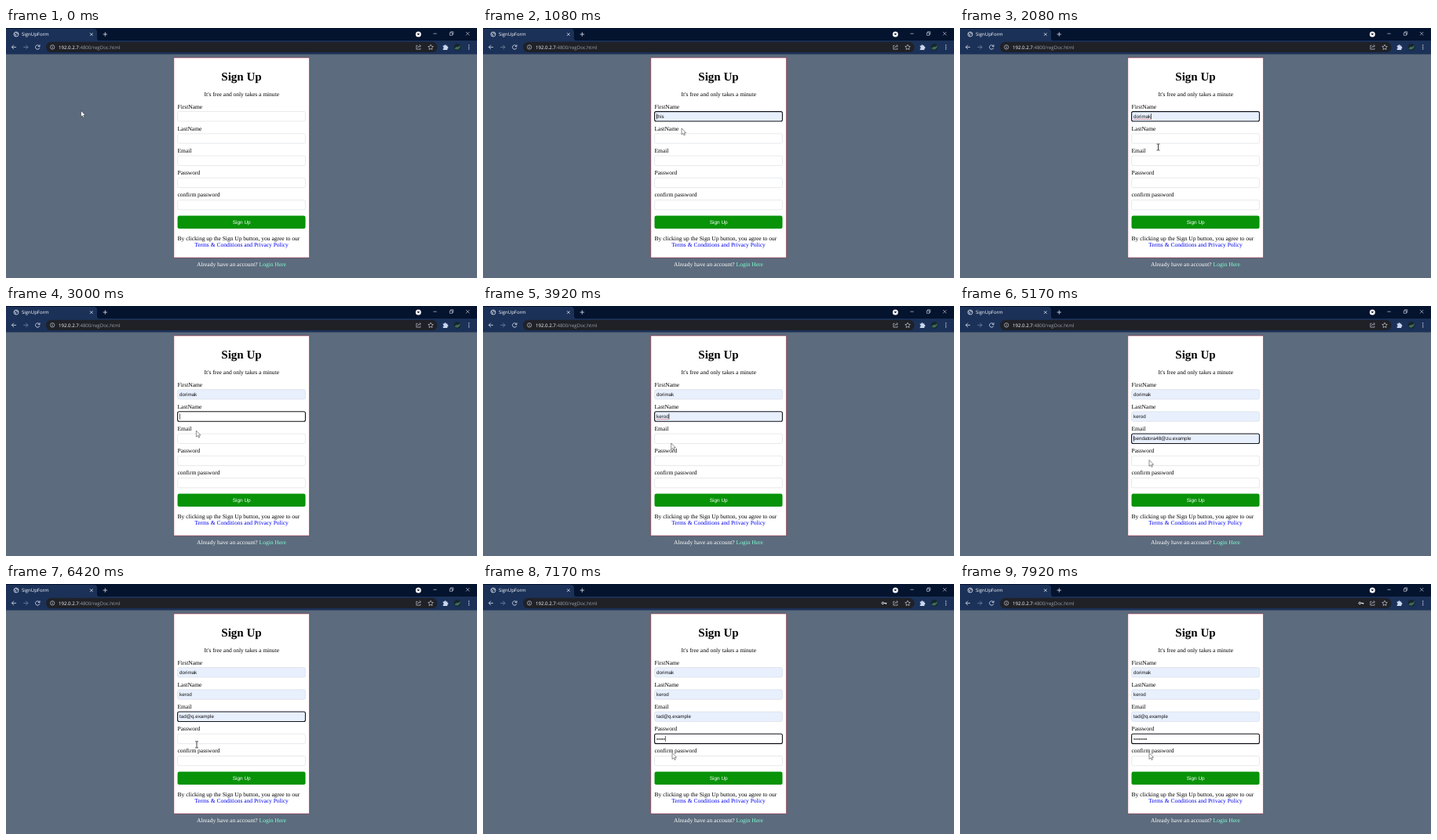
An HTML page for the animation above (8000 ms loop, 600x319 px).

```html
<!DOCTYPE html>
<html lang="en">
<head>
<meta charset="utf-8">
<title>Sign up form</title>
<style>
  html, body { margin: 0; width: 100%; height: 100%; overflow: hidden; background: #5c6b7d; }
  svg { display: block; width: 100vw; height: 100vh; }
  text { text-rendering: geometricPrecision; white-space: pre; }
  .page { font: 7.5px "Liberation Serif", Times, serif; }
  .sans { font: 6.25px "Liberation Sans", Arial, sans-serif; }
  .ui { font: 6px "Open Sans", sans-serif; fill: #fff; }
  .mid { text-anchor: middle; }
  .line { fill: none; stroke: #dfe4ee; stroke-width: .8; }
</style>
</head>
<body>
<svg id="stage" viewBox="0 0 600 319" preserveAspectRatio="none">
  <rect width="600" height="319" fill="#5c6b7d"/>

  <!-- browser window -->
  <rect width="600" height="17" fill="#04132e"/>
  <path d="M0 33.5V1H112Q116 1 116 5V13Q116 16 119 16H600V33.5Z" fill="#1b3158"/>
  <g class="line">
    <circle cx="13" cy="8" r="3"/>
    <path d="M10.2 7.2L12.6 8.2 12 10.5M12.5 5.2L13.6 7 15.8 7.6"/>
    <path d="M107 6.3l3.6 3.6m0-3.6l-3.6 3.6M123.6 8h5.4M126.3 5.3v5.4"/>
    <path d="M544.3 7.2h4.4M586 5l4.4 4.4m0-4.4L586 9.4M565.3 6h3.3v3.3h-3.3zM566.4 6v-1.2h3.4v3.4h-1.2" stroke-width=".6"/>
  </g>
  <text class="ui" x="20" y="10.2">SignUpForm</text>
  <circle cx="525.3" cy="8" r="3.5" fill="#fff"/>
  <path d="M523.5 7h3.6l-1.8 2.3z" fill="#04132e"/>

  <rect x="51" y="17.7" width="498.5" height="13.4" rx="6.7" fill="#1f2127"/>
  <g class="line">
    <path d="M13 24.4H7.4m2.6-2.7l-2.7 2.7 2.7 2.7"/>
    <path d="M22.3 24.4h5.6m-2.6-2.7l2.7 2.7-2.7 2.7" stroke="#7c89a1"/>
    <path d="M42.6 23.2A2.7 2.7 0 1 0 42.8 25.3M43 21.4v2.2h-2.2"/>
    <circle cx="59.1" cy="24.4" r="2.7" stroke-width=".6"/>
    <path d="M59.1 24v1.8M59.1 22.7v.7" stroke-width=".7"/>
    <path d="M524.4 22.3h-1.6v4.8h5.2v-1.4M524.5 25.4q.2-2.4 3-2.5M526.7 21.4l1.8 1.5-1.8 1.6" stroke-width=".6"/>
    <path d="M541 21.2l1 2.1 2.3.3-1.7 1.6.4 2.3-2-1.1-2 1.1.4-2.3-1.7-1.6 2.3-.3z" stroke-width=".6"/>
  </g>
  <text class="ui" x="67" y="26.6" style="font-size:6.1px">192.0.2.7<tspan fill="#9aa0a6">:4800/regDoc.html</tspan></text>
  <g id="key" fill="none" stroke="#e8eaed" stroke-width="1">
    <circle cx="509.3" cy="24.4" r="1.3"/>
    <path d="M510.6 24.4h3.7M513.3 24.4v1.6"/>
  </g>
  <path d="M556.7 22.4h1.7a1.1 1.1 0 0 1 2.2 0h1.7v1.7a1.1 1.1 0 0 1 0 2.2v1.6h-5.6v-1.7a1 1 0 0 0 0-2z" fill="#c9d6ee"/>
  <circle cx="575" cy="24.3" r="4.4" fill="#16262c"/>
  <path d="M571.5 26.5q1-3 3.5-2.5t3.4-2.3a4.4 4.4 0 0 1-6.9 4.8" fill="#3f6a55"/>
  <g fill="#dfe4ee"><circle cx="589.7" cy="22" r=".7"/><circle cx="589.7" cy="24.4" r=".7"/><circle cx="589.7" cy="26.8" r=".7"/></g>

  <!-- form card -->
  <rect x="213.9" y="38" width="172.3" height="255" fill="#fff" stroke="#b5283c" stroke-width=".5"/>
  <g class="page">
    <text class="mid" x="300" y="67" style="font-size:15px;font-weight:bold">Sign Up</text>
    <text class="mid" x="300.3" y="86.6">It's free and only takes a minute</text>
    <text x="218.6" y="270.6">By clicking up the Sign Up button, you agree to our</text>
    <text class="mid" x="300" y="278.8" fill="#00e">Terms &amp; Conditions and Privacy Policy</text>
    <text class="mid" x="300" y="304.4" fill="#fff">Already have an account? <tspan fill="#7fffd4">Login Here</tspan></text>
  </g>
  <g id="fields"></g>
  <rect x="218.5" y="239.5" width="163" height="16.6" rx="2.2" fill="#089308"/>
  <text class="sans mid" x="300.2" y="250.1" fill="#fff" style="font-size:6.4px">Sign Up</text>

  <path id="squiggle" fill="none" stroke="#d23c3c" stroke-width=".5"/>
  <rect id="caret" width=".6" height="7.2" fill="#000"/>
  <path id="arrow" d="M0 0V8L1.9 6.3 3.1 9 4.4 8.4 3.2 5.8H5.6Z" fill="#fff" stroke="#222" stroke-width=".5"/>
  <path id="beam" d="M-1.9-4h1.4L0-3.6.5-4h1.4M0-3.6V3.6M-1.9 4h1.4L0 3.6.5 4h1.4" fill="none" stroke="#111" stroke-width=".8"/>
</svg>
<script>
const LOOP = 8000, STEP = 250 / 3, TEXT_X = 221;
const $ = id => document.getElementById(id);

function add(parent, tag, attrs) {
  const el = document.createElementNS("http://www.w3.org/2000/svg", tag);
  for (const name in attrs) el.setAttribute(name, attrs[name]);
  return parent.appendChild(el);
}

const fields = ["FirstName", "LastName", "Email", "Password", "confirm password"].map((label, i) => {
  const y = 112.8 + i * 28.22, g = $("fields");
  add(g, "text", { class: "page", x: 218.5, y: y - 10.3 }).textContent = label;
  const box = add(g, "rect", { x: 218.6, y: y - 6.2, width: 162.8, height: 12.4, rx: 2 });
  const text = add(g, "text", { class: "sans", x: TEXT_X, y: y + 2.2, fill: "#111" });
  return { y, box, text };
});

// time, field, value, kind: a preview keeps the caret in front of the text
const entries = [
  [830, 0, "", "preview"],
  [980, 0, "this", "preview"],
  [1600, 0, "dorimak", "preview"],
  [1900, 0, "dorimak", "misspelt"],
  [2650, 1, "", "preview"],
  [3200, 1, "kerod", "preview"],
  [3580, 1, "kerod", "misspelt"],
  [4700, 2, "", "preview"],
  [4900, 2, "bendatora48@zu.example", "preview"],
  [5520, 2, "tad@q.example", "preview"],
  [5750, 2, "tad@q.example", "plain"],
  [6750, 3, "", "plain"],
  ...Array.from({ length: 8 }, (_, i) => [6850 + i * 75, 3, "•".repeat(i + 1), "plain"])
];

// time, x, y, pointer shape from that time on
const pointer = [
  [0, 95.5, 105.5, "arrow"], [250, 95.5, 105.5, "arrow"],
  [720, 251, 113, "beam"], [850, 252, 114, "arrow"], [1050, 253, 128, "arrow"],
  [1400, 253, 128, "arrow"], [1700, 252.5, 152, "arrow"], [1900, 252.5, 152, "beam"],
  [2200, 252.5, 152, "beam"], [2550, 246, 142, "beam"], [2750, 245, 143, "arrow"],
  [3250, 239.7, 175, "arrow"], [4000, 239.7, 175, "arrow"], [4400, 240, 170, "beam"],
  [4750, 240, 170, "arrow"], [5000, 241, 196.5, "arrow"], [5300, 241, 196.5, "arrow"],
  [5550, 243, 213, "arrow"], [5750, 243, 213, "beam"], [6000, 243, 213, "beam"],
  [6400, 243, 205, "beam"], [6700, 242, 198, "beam"], [6850, 242, 200, "arrow"],
  [7150, 241, 215.5, "arrow"], [LOOP, 241, 215.5, "arrow"]
];

const show = (el, on) => el.style.display = on ? "" : "none";

function drawFields(t) {
  const past = entries.filter(e => e[0] <= t);
  const current = past[past.length - 1];
  const focus = current ? current[1] : -1;
  fields.forEach(({ box, text }, i) => {
    const entry = past.filter(e => e[1] === i).pop();
    const value = entry ? entry[2] : "";
    text.textContent = value;
    box.setAttribute("fill", value && i < 3 ? "#e8f0fe" : "#fff");
    box.setAttribute("stroke", i === focus ? "#101218" : "#cfd2d8");
    box.setAttribute("stroke-width", i === focus ? 1.1 : .5);
  });
  show($("key"), t >= 6850);

  const misspelt = current && current[3] === "misspelt";
  show($("squiggle"), misspelt);
  if (!current) return show($("caret"), false);

  const { y, text } = fields[focus];
  const width = current[2] ? text.getComputedTextLength() : 0;
  // typing or choosing a value restarts the blink; a preview does not
  const start = past.filter(e => e[3] !== "preview" || !e[2]).pop()[0];
  show($("caret"), (t - start) % 1000 < 500);
  $("caret").setAttribute("x", TEXT_X + (current[3] === "preview" ? 0 : width));
  $("caret").setAttribute("y", y - 3.6);
  if (misspelt) {
    $("squiggle").setAttribute("d", `M${TEXT_X} ${y + 3.3}` + "l.7 .4 .7-.4".repeat(Math.round(width / 1.4)));
  }
}

function drawPointer(t) {
  const i = pointer.findIndex(p => p[0] > t);
  const [t0, x0, y0, shape] = pointer[i - 1], [t1, x1, y1] = pointer[i];
  const p = (t - t0) / (t1 - t0), k = p * p * (3 - 2 * p);
  for (const id of ["arrow", "beam"]) {
    show($(id), id === shape);
    $(id).setAttribute("transform", `translate(${x0 + (x1 - x0) * k} ${y0 + (y1 - y0) * k})`);
  }
}

function frame() {
  const t = Math.floor((performance.now() % LOOP + 4) / STEP) % 96 * STEP;
  drawFields(t);
  drawPointer(t);
  requestAnimationFrame(frame);
}
frame();
</script>
</body>
</html>
```
